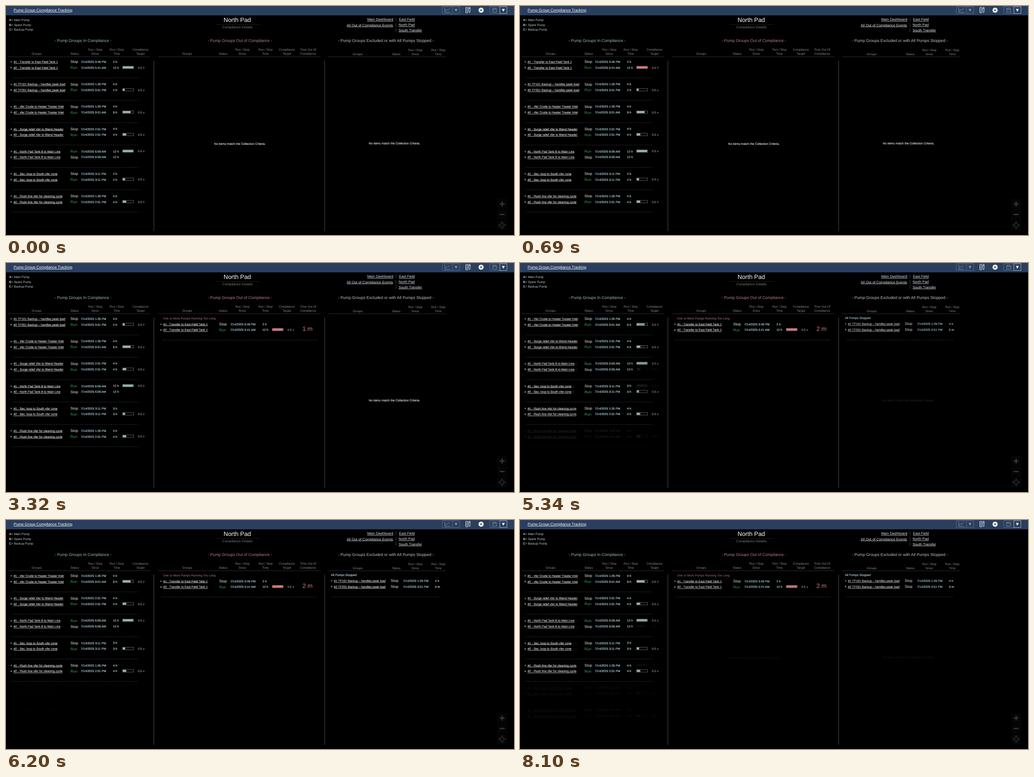
Write an HTML page that moves like this. It is 1113 by 503 pixels and loops after 8200 ms.

```html
<!DOCTYPE html>
<html lang="en">
<head>
<meta charset="utf-8">
<title>Pump Group Compliance Tracking</title>
<style>
html, body { margin: 0; width: 100%; height: 100%; overflow: hidden; background: #000; }
svg { display: block; width: 100%; height: 100%; isolation: isolate;
  font-family: "Liberation Sans", Arial, sans-serif; text-rendering: geometricPrecision; }
.link { text-decoration: underline; text-decoration-thickness: .6px; text-underline-offset: .7px; }
.state { mix-blend-mode: plus-lighter; }
.heavy { stroke-width: .14px; }
</style>
</head>
<body>
<svg id="stage" viewBox="0 0 1113 503" xmlns="http://www.w3.org/2000/svg"></svg>
<script>
const GREEN = [147, 184, 162], RED = [216, 120, 123];
const rgb = c => `rgb(${c.map(Math.round)})`;

// y is the middle of the line of text
function text(s, x, y, size, fill, { anchor = 'start', cls = '', extra = '' } = {}) {
  const stroke = cls.includes('heavy') ? `stroke="${fill}"` : '';
  return `<text x="${x}" y="${y + size * .36}" font-size="${size}" fill="${fill}" ${stroke}
    text-anchor="${anchor}" class="${cls}" ${extra}>${s}</text>`;
}
const mid = (s, x, y, size, fill, cls) => text(s, x, y, size, fill, { anchor: 'middle', cls });
const path = (d, stroke, more = '') => `<path d="${d}" fill="none" stroke="${stroke}" ${more}/>`;
const rect = (x, y, w, h, more) => `<rect x="${x}" y="${y}" width="${w}" height="${h}" ${more}/>`;
const dashes = (x1, x2, y) => path(`M${x1} ${y}H${x2}`, '#3c3c3c', 'stroke-width=".8" stroke-dasharray="3 1.8"');

// Pump rows: [name, status, clock, time, bar width]
const DAY = '7/14/2025 ';
const transfer = [
  ['#1 - Transfer to East Field Tank 1', 'Stop', '3:46 PM', '2 h'],
  ['#2 - Transfer to East Field Tank 1', 'Run', '5:41 AM', '12 h', 23]];
const backup = [
  ['#1 TP101 Backup – handles peak load', 'Stop', '1:26 PM', '4 h'],
  ['#2 TP201 Backup – handles peak load', 'Run', '3:51 PM', '2 h', 4]];
const stopped = [backup[0], [backup[1][0], 'Stop', '3:51 PM', '0 m']];
const others = loopTime => [
  [['#1 - xfer Crude to Heater Treater Inlet', 'Stop', '1:26 PM', '4 h'],
   ['#2 - xfer Crude to Heater Treater Inlet', 'Run', '9:01 AM', '9 h', 17]],
  [['#1 - Surge relief xfer to Blend Header', 'Stop', '2:01 PM', '4 h'],
   ['#2 - Surge relief xfer to Blend Header', 'Run', '2:01 PM', '4 h', 7.5]],
  [['#1 - North Pad Tank B to Main Line', 'Run', '6:06 AM', '12 h', 22.5],
   ['#2 - North Pad Tank B to Main Line', 'Stop', '6:06 AM', '12 h']],
  [['#1 - Sec. loop to South xfer zone', 'Stop', '3:11 PM', loopTime],
   ['#2 - Sec. loop to South xfer zone', 'Run', '3:11 PM', loopTime, 5]],
  [['#1 - Flush line xfer for cleaning cycle', 'Stop', '1:26 PM', '4 h'],
   ['#2 - Flush line xfer for cleaning cycle', 'Run', '2:01 PM', '4 h', 7.5]]];

const LEFT = { label: 10, name: 16.7, status: 141.3, date: 191.6, time: 234.6, bar: 255.5, dash: [13, 291] };
const MIDDLE = { label: 338, name: 344.8, status: 467, date: 519, time: 562, bar: 583.3, dash: [341, 680] };
const RIGHT = { label: 712, name: 718.5, status: 843, date: 897.8, time: 940, dash: [715, 950] };

function group(rows, col, y, barFill, id = '') {
  return rows.map(([name, status, clock, time, bar], i) => {
    const ry = y + i * 12.8;
    let out = text('AB'[i], col.label, ry, 4.6, '#ccc', { cls: 'heavy' }) +
      text(name, col.name, ry, 6.6, '#dcdce2', { cls: 'link heavy' }) +
      text(status, col.status, ry - .2, 8.1, status === 'Run' ? '#2db052' : '#f0f0f0') +
      mid(DAY + clock, col.date, ry, 6.6, '#b9e6ee', 'heavy') +
      text(time, col.time, ry, 6.5, '#e0f0f0', { cls: 'heavy' });
    if (bar) out +=
      rect(col.bar, ry - 3.4, 24, 5.4, 'fill="#000" stroke="#666" stroke-width=".9"') +
      rect(col.bar + .5, ry - 3, bar, 4.6, `fill="${rgb(barFill)}" ${id}`) +
      text('0.5', col.bar + 33.4, ry - .2, 6.5, '#ccc') +
      text('d', col.bar + 44.7, ry, 5.2, '#ccc');
    return out;
  }).join('') + dashes(...col.dash, y + 35.2);
}
const noItems = (x, y) => mid('No items match the Collection Criteria.', x, y, 6.62, '#dcdcdc', 'heavy');
const column = groups => groups.map((g, i) =>
  group(g, LEFT, 122.7 + i * 49.15, GREEN, g === transfer ? 'id="hot"' : '')).join('');
const late = text('One or More Pumps Running Too Long', 344.3, 121.7, 6.62, '#b87b7e') +
  group(transfer, MIDDLE, 134.2, RED);

const states = [
  column([transfer, backup, ...others('2 h')]) + noItems(512.5, 302.7) + noItems(851.2, 301.5),
  column([backup, ...others('3 h')]) + late + noItems(851.2, 301.5),
  column(others('3 h')) + late +
    text('All Pumps Stopped', 712, 120.6, 6.6, '#b9dfe8', { cls: 'heavy' }) + group(stopped, RIGHT, 133.7, GREEN)];

// Column heads: [x, lower line, upper line]
const heads = (y, list) => list.map(([x, lower, upper = '']) =>
  mid(upper, x, y, 6.6, '#8c8c8c') + mid(lower, x, y + 9.3, 6.6, '#8c8c8c')).join('');
const RUN = 'Run / Stop';

function toolbar() {
  const dim = '#5d6f8a', soft = '#8593a8', light = '#f2f4f8', thin = 'stroke-width=".9"';
  const tri = (x, fill) => `<path d="M${x - 3.2} 6.5h6.4l-3.2 6z" fill="${fill}"/>`;
  let teeth = '';
  for (let a = 0; a < 360; a += 45)
    teeth += rect(1039.4, 3.4, 3, 4, `fill="${light}" transform="rotate(${a} 1040.9 9.2)"`);
  return rect(0, 0, 1113, 20.5, 'fill="#2a3f5f"') +
    text('Pump Group Compliance Tracking', 16.8, 9, 8.42, '#fff', { cls: 'link' }) +
    path('M956 1.5h38v15h-38zM978 1.5v15', dim, thin) +
    path('M961.5 4v10h11M963 11.5l3-4 2 2 4-4.5', soft, thin) + tri(986, soft) +
    path('M1007.5 3h4v12h-4zM1007.5 6h2M1007.5 9h2M1007.5 12h2', light, thin) +
    path('M1014 3h3v9l-1.5 3-1.5-3zM1014 5.5h3', light, thin) +
    teeth + `<circle cx="1040.9" cy="9.2" r="3.2" fill="none" stroke="${light}" stroke-width="2.2"/>` +
    path('M1082 1.5h-22v15h22', dim, thin) +
    path('M1066.5 5h7l1.5 1.5v7h-8.5zM1068.5 5v3h4.5v-3', soft, thin) +
    rect(1082, 1.5, 15.5, 15, `fill="none" stroke="#b3bccb" ${thin}`) + tri(1089.7, '#fff');
}

function zoomButtons() {
  const c = '#3a3a3a';
  const box = y => rect(1076, y - 11, 22.5, 22, 'fill="#050505"');
  const arrow = a => `<path d="M1087 473l2.3 2.8h-4.6z" fill="${c}" transform="rotate(${a} 1087 481.5)"/>`;
  return [435, 458, 481.5].map(box).join('') +
    path('M1081.5 435h11M1087 429.5v11M1081.5 458h11', c, 'stroke-width="2.4"') +
    rect(1083.5, 478, 7, 7, `fill="none" stroke="${c}"`) + [0, 90, 180, 270].map(arrow).join('');
}

const nav = (s, x, y, anchor) => text(s, x, y, 7.8, '#dfe3ea', { anchor, cls: 'link' });
const legend = ['Main', 'Spare', 'Backup'].map((s, i) =>
  text(`<tspan font-weight="bold">${'ABC'[i]}</tspan>= ${s} Pump`, 6.8, 31 + i * 10.5, 6.75, '#c6ccd0')).join('');

const fixed = toolbar() + legend +
  mid('North Pad', 506.8, 30.6, 13.3, '#fff') + dashes(461, 556, 40.5) +
  mid('Compliance Details', 507, 46.5, 7.7, '#777') +
  nav('Main Dashboard', 848.6, 29.5, 'end') + nav('All Out of Compliance Events', 848, 41.7, 'end') +
  nav('East Field', 861, 29.5) + nav('North Pad', 860.3, 41.2) + nav('South Transfer', 860.3, 52.8) +
  path('M854.5 25v9M854.5 37v9M854.5 48v9', '#505050', 'stroke-width=".8"') +
  mid('- Pump Groups In Compliance -', 168.7, 75.8, 8.87, '#95c2a6') +
  mid('- Pump Groups Out of Compliance -', 512.5, 75.8, 8.85, '#bd8083') +
  mid('- Pump Groups Excluded or with All Pumps Stopped -', 832.3, 75.8, 8.85, '#c3c3cb') +
  heads(95.3, [[67, 'Groups'], [150.5, 'Status'], [195.5, 'Since', RUN], [242.6, 'Time', RUN],
    [294.7, 'Target', 'Compliance'],
    [397, 'Groups'], [475.6, 'Status'], [517.8, 'Since', RUN], [568.5, 'Time', RUN],
    [615.5, 'Target', 'Compliance'], [662, 'Compliance', 'Time Out Of']]) +
  heads(96.3, [[770.5, 'Groups'], [855, 'Status'], [896.8, 'Since', RUN], [947, 'Time', RUN]]) +
  path('M4 111.5H316M333 111.5H689M706 111.5H964', '#303030', 'stroke-width=".9"') +
  path('M324 120V494M698 120V494', '#4a4a4a', 'stroke-width="1.1"') + zoomButtons();

document.getElementById('stage').innerHTML = rect(0, 0, 1113, 503, 'fill="#000"') + fixed +
  states.map(s => `<g class="state">${s}</g>`).join('') +
  text('', 649.5, 144.3, 13.3, '#d77b7d', { extra: 'id="overdue"' });

const layers = document.querySelectorAll('.state');
const hot = document.getElementById('hot');
const overdue = document.getElementById('overdue');
const clamp = v => Math.min(1, Math.max(0, v));

// The outgoing state lingers faintly, then dies away
const fading = (t, start, end) => .13 * (1 - clamp((t - start - 70) / (end - start - 70)));

function draw(now) {
  const t = now % 8200;
  const mix = [0, 0, 0];
  if (t < 2750) mix[0] = 1;
  else if (t < 5340) {
    mix[0] = fading(t, 2750, 3060);
    mix[1] = 1 - mix[0];
  } else {
    mix[0] = .06 * clamp((t - 5700) / 2400) ** 2;
    mix[1] = fading(t, 5340, 5550);
    mix[2] = 1 - mix[0] - mix[1];
  }
  layers.forEach((g, i) => {
    g.style.opacity = mix[i];
    g.style.display = mix[i] ? '' : 'none';
  });
  const heat = 1 - (1 - clamp((t - 30) / 660)) ** 3;
  hot.setAttribute('fill', rgb(GREEN.map((c, i) => c + (RED[i] - c) * heat)));
  overdue.textContent = t < 5340 ? '1 m' : '2 m';
  overdue.setAttribute('opacity', clamp((t - 2820) / 240));
}

const start = performance.now();
function tick() {
  draw(performance.now() - start);
  requestAnimationFrame(tick);
}
tick();
</script>
</body>
</html>
```
